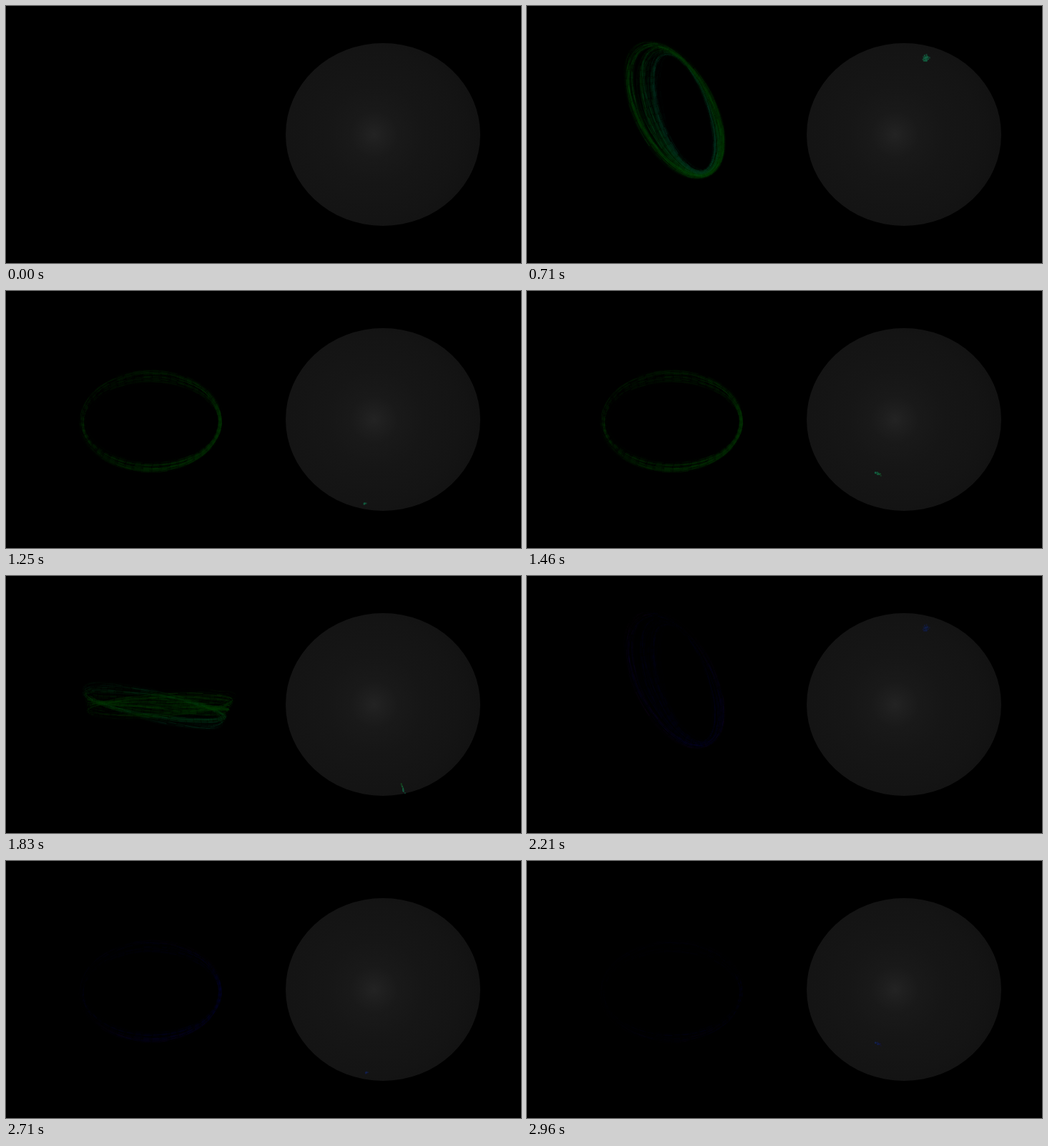
An HTML page with a canvas that plays this animation: 720x360 px, repeating every 3000 ms.

```html
<!DOCTYPE html>
<html lang="en">
<head>
<meta charset="utf-8">
<title>Ribbon and sphere</title>
<style>
html, body { margin: 0; width: 100%; height: 100%; overflow: hidden; background: #000; }
canvas { display: block; }
</style>
</head>
<body>
<canvas id="stage" width="720" height="360"></canvas>
<script>
const ctx = document.getElementById('stage').getContext('2d');
const LOOP = 3000, FPS = 24, FRAMES = 72, CYCLE = 36, TAU = Math.PI * 2;
const STRANDS = 70, SAMPLES = 48;

// A ribbon spans two tilted ellipses [cx, cy, rx, ry, degrees];
// its tone is [hue of the first, hue of the second, brightness].
// Opposite signs of ry make the ribbon twist through its middle.
const upright = [[204, 145, 105, 58, 60], [222, 150, 85, 32, 73], [118, 165, 1]];
const wide = [[202, 144, 125, 78, 22], [232, 155, 88, 38, 38], [112, 158, 0.9]];
const tilted = [[214, 143, 118, 72, 20], [236, 163, 92, 38, 30], [112, 158, 0.9]];
const oval = [[202, 182, 98, 72, 0], [204, 184, 95, 57, 0], [125, 100, 0.5]];
const flat = [[205, 181, 100, 25, 15], [217, 181, 102, -18, -6], [165, 98, 0.75]];

const ribbonKeys = [[8, flat], [17, upright], [24, wide], [25, tilted],
  [28, oval], [35, oval], [44, flat], [53, upright]];

// Path of the spot over the sphere.
const spotKeys = [[12, [608, 118]], [17, [559, 72]], [23, [549, 78]], [24, [545, 110]],
  [25, [542, 143]], [29, [505, 296]], [32, [498, 300]], [35, [486, 254]],
  [36, [486, 255]], [38, [598, 286]], [44, [557, 304]], [45, [550, 301]], [48, [608, 118]]];

const clamp = v => Math.max(0, Math.min(1, v));
const mix = (a, b, t) => Array.isArray(a) ? a.map((v, i) => mix(v, b[i], t)) : a + (b - a) * t;

function valueAt(keys, f) {
  let i = 0;
  while (i < keys.length - 2 && keys[i + 1][0] <= f) i++;
  const [[f0, a], [f1, b]] = [keys[i], keys[i + 1]];
  return mix(a, b, clamp((f - f0) / (f1 - f0)));
}

function seeded(seed) {
  return () => (seed = seed * 16807 % 2147483647) / 2147483647;
}

function onEllipse([cx, cy, rx, ry, degrees], angle) {
  const turn = degrees * TAU / 360, x = rx * Math.cos(angle), y = ry * Math.sin(angle);
  return [cx + x * Math.cos(turn) - y * Math.sin(turn), cy + x * Math.sin(turn) + y * Math.cos(turn)];
}

function drawRibbon([outer, inner, tone], blue, fade) {
  const [hA, hB] = blue ? [300, 234] : tone;
  const rnd = seeded(4711);
  for (let k = 0; k < STRANDS; k++) {
    const t = Math.pow(rnd(), 0.7), strength = 0.15 + 0.75 * rnd() * rnd();
    const swing = rnd() * TAU, sway = rnd() * 0.08, dx = rnd() * 5 - 2.5, dy = rnd() * 5 - 2.5;
    const edge = blue ? Math.min(1, t * 2.2) : t;
    const at = angle => {
      const [x, y] = mix(onEllipse(outer, angle), onEllipse(inner, angle),
        t + sway * Math.sin(angle * 2 + swing));
      return [x + dx, y + dy];
    };
    ctx.strokeStyle = `hsl(${mix(hA, hB, edge)}, 82%, ${mix(18, 14, edge)}%)`;
    let from = at(0);
    for (let i = 1; i <= SAMPLES; i++) {
      const angle = i / SAMPLES * TAU, to = at(angle);
      const alpha = fade * tone[2] * strength * (0.8 - 0.2 * Math.cos(angle - 3.8));
      ctx.beginPath();
      ctx.moveTo(...from);
      ctx.lineTo(...to);
      ctx.lineWidth = 5;
      ctx.globalAlpha = alpha * 0.12;
      ctx.stroke();
      ctx.lineWidth = 0.9;
      ctx.globalAlpha = alpha * rnd();
      ctx.stroke();
      from = to;
    }
  }
  ctx.globalAlpha = 1;
}

// The spot is smeared along the way it is about to go.
function drawSpot(f, blue, fade) {
  const head = valueAt(spotKeys, f), tail = valueAt(spotKeys, f + 1.15);
  const length = Math.hypot(tail[0] - head[0], tail[1] - head[1]);
  const size = 2 + 7 * clamp((280 - head[1]) / 200);
  const shift = Math.min(45, length) * 2;
  const hue = t => blue ? 225 + shift * t * t : 158 - shift * t * t;
  const rnd = seeded(99);
  const count = 4 + Math.round((length + size) * size / 3);
  for (let i = 0; i < count; i++) {
    const t = rnd(), angle = rnd() * TAU, r = Math.sqrt(rnd()) * size / 2;
    const [x, y] = mix(head, tail, t);
    ctx.globalAlpha = fade * (0.3 + 0.5 * rnd());
    ctx.fillStyle = `hsl(${hue(t)}, 65%, 24%)`;
    ctx.fillRect(x + r * Math.cos(angle) - 1, y + r * Math.sin(angle) - 1, 2, 2);
  }
  ctx.globalAlpha = 1;
}

const shade = ctx.createRadialGradient(515, 180, 0, 515, 180, 150);
[[0, '#232323'], [0.1, '#1e1e1e'], [0.22, '#191919'], [0.45, '#161616'], [0.8, '#141414'], [1, '#121212']]
  .forEach(stop => shade.addColorStop(...stop));

function draw(frame) {
  ctx.fillStyle = '#000';
  ctx.fillRect(0, 0, 720, 360);
  ctx.fillStyle = shade;
  ctx.beginPath();
  ctx.ellipse(527, 180, 136, 128, 0, 0, TAU);
  ctx.fill();

  // A green cycle, then a blue one that the end of the loop cuts short.
  const blue = frame >= 52;
  if (frame < 12 || (frame >= 48 && !blue)) return;
  const f = blue ? frame - CYCLE : frame;
  const fade = blue
    ? clamp((frame - 51) / 4) * (0.85 - 0.3 * clamp((frame - 61) / 10))
    : clamp((f - 11) / 5) * clamp((48 - f) / 4);
  drawRibbon(valueAt(ribbonKeys, f), blue, fade);
  drawSpot(f, blue, fade);
}

const start = performance.now();
let shown = -1;
function tick() {
  const time = (performance.now() - start) % LOOP;
  // Frames start at times rounded to 10 ms, so allow a little slack.
  const frame = Math.min(FRAMES - 1, Math.floor(time * FPS / 1000 + 0.1));
  if (frame !== shown) draw(shown = frame);
  requestAnimationFrame(tick);
}
tick();
</script>
</body>
</html>
```
